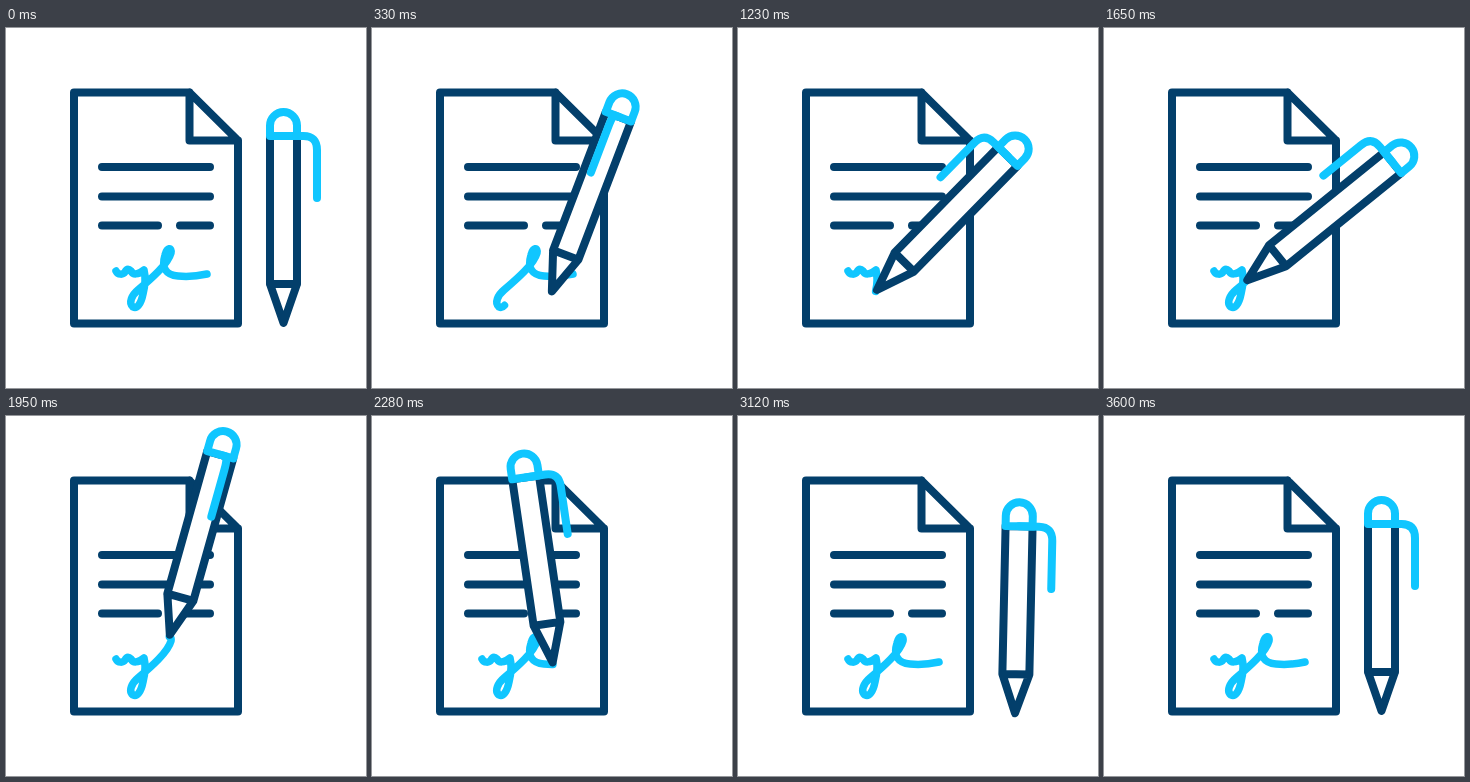
Recreate the animation shown at these times as an HTML page without scripts. Size 360 by 360 pixels, loop 3.63 s.

```html
<!DOCTYPE html>
<html lang="en">
<head>
<meta charset="utf-8">
<title>Signing a document</title>
<style>
  html, body { margin: 0; width: 100%; height: 100%; overflow: hidden; background: #fff; }
  svg { display: block; width: 100vw; height: 100vh; }
  path { fill: none; stroke: #033f6b; stroke-width: 8; stroke-linecap: round; stroke-linejoin: round; }
  .ink { stroke: #10c6ff; }
  .signature { stroke-width: 7.5; stroke-dasharray: 1 2; }
  .solid { fill: #fff; }
  .clip { vector-effect: non-scaling-stroke; }
</style>
</head>
<body>
<svg viewBox="0 0 360 360">
  <defs>
    <path id="signature" class="ink signature" pathLength="1"
      d="M110 243C112 247 117 247 119 244C121 240 123 241 125 243C127 247 132 247 138 242
         C140 250 139 258 137 266C135 276 131 281 127 279C122 275 126 267 132 262
         C146 250 162 236 165 225C166 219 161 219 159 227C155 240 160 247 172 248C182 249 192 248 201 246"/>
  </defs>

  <!-- Page -->
  <path d="M183.500 64.500H68V295.500H232V112.500L183.500 64.500V112.500H232"/>
  <path d="M96 139H204M96 168.500H204M96 197.500H152M174 197.500H204"/>

  <!-- Finished signature wipes away while the new one is written -->
  <use href="#signature">
    <animate attributeName="stroke-dashoffset" dur="3.63s" repeatCount="indefinite" calcMode="spline"
      values="0;-1.05;-1.05" keyTimes="0;.24;1" keySplines=".4 0 .6 1;0 0 1 1"/>
  </use>
  <use href="#signature" stroke-dashoffset="1.04">
    <animate attributeName="stroke-dashoffset" dur="3.63s" repeatCount="indefinite"
      values="1.04;1;.937;.747;.5;.094;0;0" keyTimes="0;.165;.2066;.339;.4545;.628;.661;1"/>
  </use>

  <!-- Pen: carried to and from the page, moved along the signature, tilted about its tip -->
  <g>
    <animateTransform attributeName="transform" type="translate" dur="3.63s" repeatCount="indefinite" calcMode="spline"
      values="167.5 54;0 0;0 0;61 -17;77 58;76.5 51;76.5 51" keyTimes="0;.165;.661;.7355;.893;.992;1"
      keySplines=".4 0 .6 1;0 0 1 1;.3 0 .6 1;.3 0 .5 1;.4 0 .6 1;0 0 1 1"/>
    <g>
      <animateMotion dur="3.63s" repeatCount="indefinite" calcMode="linear"
        keyPoints="0;0;.063;.253;.5;.906;1;1" keyTimes="0;.165;.2066;.339;.4545;.628;.661;1">
        <mpath href="#signature"/>
      </animateMotion>
      <g>
        <animateTransform attributeName="transform" type="rotate" dur="3.63s" repeatCount="indefinite" calcMode="spline"
          values="0;35.5;37;44.4;51;51;-6;-8.3;-14.7;2.4;0;0"
          keyTimes="0;.165;.2066;.339;.4545;.471;.587;.628;.7355;.9;.992;1"
          keySplines=".4 0 .6 1;0 0 1 1;0 0 1 1;0 0 1 1;0 0 1 1;.4 0 .6 1;0 0 1 1;0 0 1 1;.4 0 .4 1;.4 0 .6 1;0 0 1 1"/>
        <path class="solid" d="M-13.500 -189V-41L0 -2L13.500 -41V-189ZM-13.500 -41H13.500"/>
        <path class="ink solid" d="M-13.500 -189V-199.500A13.500 13.500 0 0 1 13.500 -199.500V-189Z"/>
        <path class="ink clip" d="M0 -189H20Q33.500 -189 33.500 -175V-127">
          <animateTransform attributeName="transform" type="scale" dur="3.63s" repeatCount="indefinite" calcMode="spline"
            values="1 1;-1 1;-1 1;1 1;1 1" keyTimes="0;.165;.471;.587;1"
            keySplines=".4 0 .6 1;0 0 1 1;.4 0 .6 1;0 0 1 1"/>
        </path>
      </g>
    </g>
  </g>
</svg>
</body>
</html>
```
